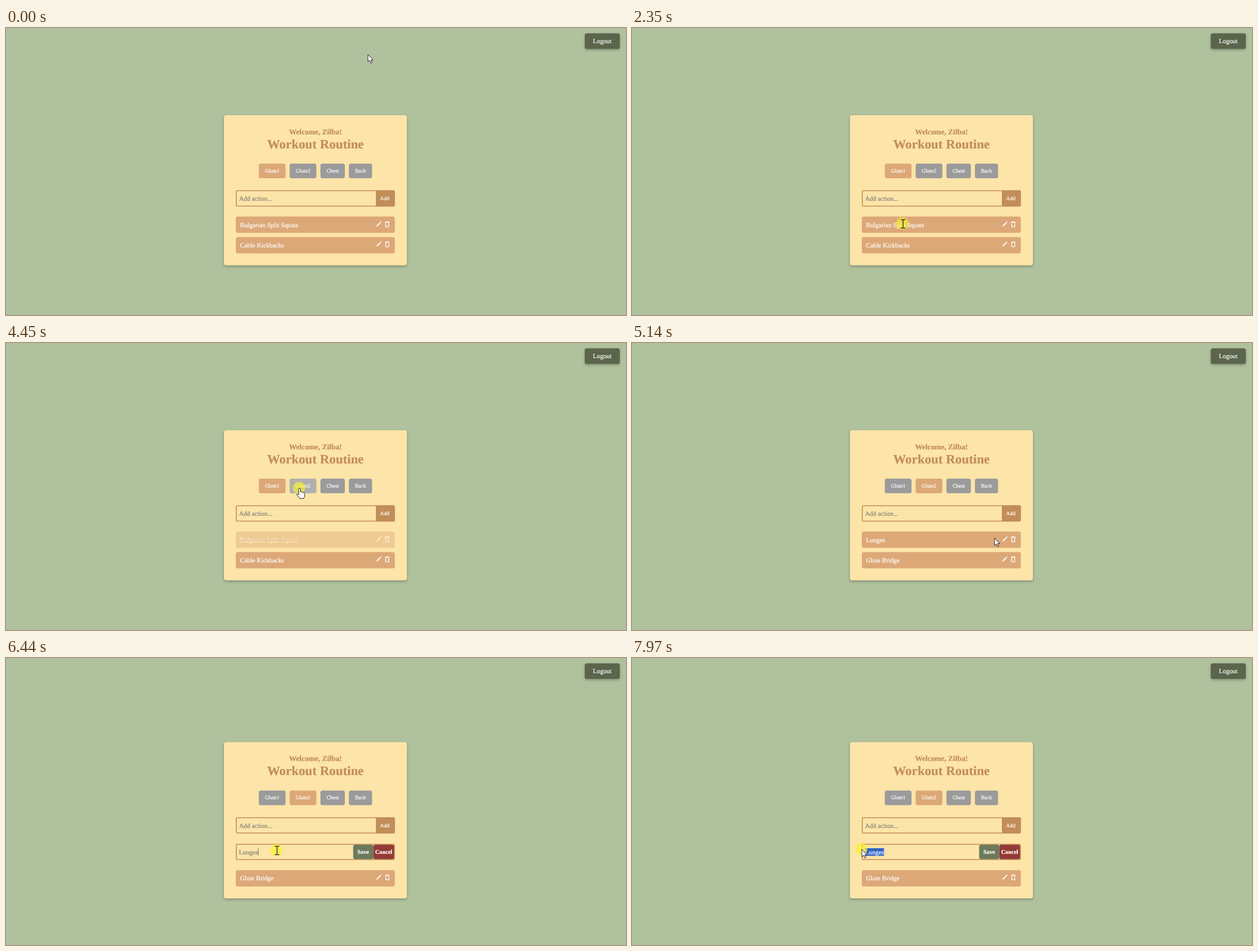
An HTML page for the animation above (8 s loop, 1098 px wide and 510 px high).

```html
<!DOCTYPE html>
<html lang="en">
<head>
<meta charset="utf-8">
<title>Workout Routine</title>
<style>
  html, body { margin: 0; width: 100%; height: 100%; overflow: hidden; background: #b0c19d; }
  svg { display: block; width: 1098px; height: 510px; }
  text {
    --ink: #fff;
    font-family: "Liberation Serif", "Times New Roman", serif; font-size: 11.44px;
    fill: var(--ink); stroke: var(--ink); stroke-width: .22; text-rendering: geometricPrecision;
  }
  .mid { text-anchor: middle; }
  .head { --ink: #c28d58; font-weight: bold; }
  .small { font-size: 9.53px; }
  .bold { font-size: 10.3px; font-weight: bold; }
  .muted { --ink: #85827a; pointer-events: none; }
  .tan { fill: #dda878; }
  .field { fill: none; stroke: #c28d58; stroke-width: 1.6; pointer-events: fill; }
  .icons { pointer-events: bounding-box; }
  .raised { filter: drop-shadow(0 2px 2px rgba(0, 0, 0, .28)); }
  .pointer { fill: #fff; stroke: #222; stroke-width: 1; stroke-linejoin: round; }
  .ghost { pointer-events: none; }
</style>
</head>
<body>
<svg viewBox="0 0 1098 510">
  <defs>
    <g id="icons" fill="none" stroke="#fff">
      <path d="M656.6 352.1l5.9-5.9M663.1 345.6l1.2-1.2" stroke-width="2.2"/>
      <path d="M671.4 345h7.6M672.5 345.2v7.9h5.3v-7.9M673.8 344.3h2.8" stroke-width="1.3"/>
    </g>
    <clipPath id="clip"><rect id="clipBox" y="338" height="13.6"/></clipPath>
  </defs>

  <rect class="raised" x="1025" y="9.5" width="62" height="27.5" rx="3.5" fill="#5a654b"/>
  <text class="mid" x="1056" y="27.3">Logout</text>

  <rect id="card" class="raised" x="386" width="324" rx="4" fill="#fde4a8"/>

  <g id="top">
    <text class="head mid" x="548" y="188.7" style="font-size:13.38px">Welcome, Zilba!</text>
    <text class="head mid" x="548" y="213.8" style="font-size:22.9px">Workout Routine</text>
    <g id="tabs" data-cursor="hand"></g>
    <rect class="field" data-cursor="beam" x="407.8" y="289.3" width="280" height="27.2" rx="1.5"/>
    <text class="muted" x="412.7" y="307">Add action...</text>
    <g data-cursor="hand">
      <path fill="#c28d58" d="M655 288.5h31.6q2 0 2 2v24.8q0 2-2 2H655z"/>
      <text class="small mid" x="670.8" y="306">Add</text>
    </g>
  </g>

  <g id="first">
    <rect class="tan" x="407" y="335" width="281.6" height="29" rx="3.5"/>
    <text id="firstText" data-cursor="beam" x="414.5" y="354"></text>
    <path id="strike" class="ghost" d="M414.5 350.6H518.5" stroke="#a9774a"/>
    <use href="#icons" class="icons" data-cursor="hand"/>
  </g>

  <g id="edit">
    <rect class="field" data-cursor="beam" x="407.8" y="331" width="280" height="27.2" rx="1.5"/>
    <text id="value" class="muted" x="412.6" y="349">Lunges</text>
    <path id="caret" class="ghost" d="M446.7 338.3v13" stroke="#555" stroke-width=".8"/>
    <g class="ghost" clip-path="url(#clip)">
      <rect x="400" y="330" width="60" height="30" fill="#2f62c4"/>
      <text x="412.6" y="349">Lunges</text>
    </g>
    <g data-cursor="hand">
      <rect x="614.8" y="331.8" width="35.6" height="25.6" rx="3.5" fill="#6b7a5c"/>
      <rect x="650.4" y="331.8" width="36.8" height="25.6" rx="3.5" fill="#943a36"/>
      <text class="bold mid" x="632.6" y="347.6">Save</text>
      <text class="bold mid" x="668.8" y="347.6">Cancel</text>
    </g>
  </g>

  <g id="second">
    <rect class="tan" x="407" y="371.6" width="281.6" height="28.8" rx="3.5"/>
    <text id="secondText" data-cursor="beam" x="414.5" y="389.7"></text>
    <use href="#icons" class="icons" data-cursor="hand" y="35.6"/>
  </g>

  <g class="ghost">
    <circle id="press" r="10.8" fill="#fbf424" fill-opacity=".63"/>
    <g id="cursor">
      <path id="arrow" class="pointer" d="M0 0V13.2L3 10.4 5.2 15.4 7.4 14.4 5.2 9.7H9.3Z"/>
      <path id="hand" class="pointer" d="M-1.6 1.3Q-1.6 0 0 0T1.5 1.3V6.5q2.2-.9 2.7.7 2-.7 2.5.8 2.2-.3 2.2 1.6V13q0 2.5-1.6 5.2H.2Q-2 15-5.4 11.2q.8-2.2 3.8.4Z"/>
      <path id="beam" d="M-4-7.5h2.8q1.2 0 1.2 1 0-1 1.2-1H4M0-7V7M-4 7.5h2.8q1.2 0 1.2-1 0 1 1.2 1H4" fill="none" stroke="#25313c" stroke-width="1.4"/>
    </g>
  </g>
</svg>
<script>
const LOOP = 8000, STEP = 68, CLICK = 70;
const CHECK = 2350, SWITCH = 4450, EDIT = 5630, FOCUS = 6440, BLINK = 6960, DRAG = 7360;

const $ = id => document.getElementById(id);
const show = (id, on) => $(id).setAttribute("display", on ? "inline" : "none");
const shift = (id, x, y) => $(id).setAttribute("transform", `translate(${x} ${y})`);

// Tabs are as wide as their label plus padding, and centred as a row.
function buildTabs(names, pad = 21.5, gap = 7.2) {
  $("tabs").innerHTML = names.map(name =>
    `<g><rect y="241" height="26" rx="3.5"/><text class="small mid" y="256.8">${name}</text></g>`).join("");
  const tabs = [...$("tabs").children].map(g => g.children);
  const widths = tabs.map(([, label]) => label.getComputedTextLength() + pad);
  let x = 548 - (widths.reduce((a, b) => a + b + gap)) / 2;
  tabs.forEach(([box, label], i) => {
    box.setAttribute("x", x);
    box.setAttribute("width", widths[i]);
    label.setAttribute("x", x + widths[i] / 2);
    x += widths[i] + gap;
  });
  return tabs.map(([box]) => box);
}
const tabBoxes = buildTabs(["Glute1", "Glute2", "Chest", "Back"]);

// Cursor moves along curves: start and end time, bend, goal.
const moves = [
  { start: 720, end: 1470, bend: [591, 295], goal: [499, 330] },
  { start: 1540, end: 1960, bend: [490, 340], goal: [480, 348] },
  { start: 3310, end: 3980, bend: [525, 245], goal: [520, 258] },
  { start: 4520, end: 5210, bend: [602, 349], goal: [657, 348] },
  { start: 5360, end: 5410, bend: [658, 349], goal: [659, 349] },
  { start: EDIT, end: 6240, bend: [560, 349], goal: [480, 342] },
  { start: DRAG, end: 7770, bend: [445, 342], goal: [407, 340] }
];

function cursorAt(t) {
  let pos = [641, 47];
  for (const { start, end, bend, goal } of moves) {
    if (t < start) break;
    const done = (Math.floor((t - start) / STEP + .15) + 1) * STEP;
    const s = Math.min(1, done / (end - start + STEP)) ** 1.3;
    pos = pos.map((from, i) => (1 - s) ** 2 * from + 2 * s * (1 - s) * bend[i] + s * s * goal[i]);
  }
  return pos;
}

const shapeAt = (x, y) =>
  document.elementFromPoint(x, y)?.closest("[data-cursor]")?.dataset.cursor ?? "arrow";

// The selection snaps to the nearest edge between letters.
function selectionEdges(x) {
  const value = $("value"), last = value.getNumberOfChars() - 1;
  const end = value.getEndPositionOfChar(last).x;
  let left = end;
  for (let i = last; i >= 0; i--) {
    const edge = value.getStartPositionOfChar(i).x;
    if (Math.abs(edge - x) < Math.abs(left - x)) left = edge;
  }
  return [left, end];
}

function draw(t) {
  const within = (from, length = CLICK) => t >= from && t < from + length;
  const done = t >= CHECK + CLICK && t < SWITCH + CLICK;
  const active = t < SWITCH + CLICK ? 0 : 1;
  const editing = t >= EDIT + CLICK;
  const lift = editing ? 5.5 : 0;
  const [x, y] = cursorAt(t);

  $("card").setAttribute("y", 155 - lift);
  $("card").setAttribute("height", 266.7 + 2 * lift);
  shift("top", 0, -lift);
  shift("second", 0, lift);

  tabBoxes.forEach((box, i) => {
    const held = i === 1 && within(SWITCH);
    box.setAttribute("fill", held ? "#b0b0ae" : i === active ? "#dda878" : "#9b9b9b");
  });
  $("firstText").textContent = active ? "Lunges" : "Bulgarian Split Squats";
  $("secondText").textContent = active ? "Glute Bridge" : "Cable Kickbacks";
  $("first").setAttribute("opacity", done ? .41 : 1);
  show("strike", done);
  show("first", !editing);
  show("edit", editing);

  if (editing) {
    const [left, end] = selectionEdges(t < DRAG ? Infinity : x);
    $("clipBox").setAttribute("x", left);
    $("clipBox").setAttribute("width", end - left);
    show("caret", t >= FOCUS && t < BLINK || t >= DRAG && left === end);
  }

  show("press", [CHECK, SWITCH, EDIT].some(at => within(at)) || within(FOCUS, 190) || t >= DRAG);
  shift("press", x - 1, y - .7);
  shift("cursor", x, y);
  const shape = shapeAt(x, y);
  for (const id of ["arrow", "hand", "beam"]) show(id, id === shape);
}

const begin = performance.now();
function tick() {
  draw((performance.now() - begin) % LOOP);
  requestAnimationFrame(tick);
}
tick();
</script>
</body>
</html>
```
